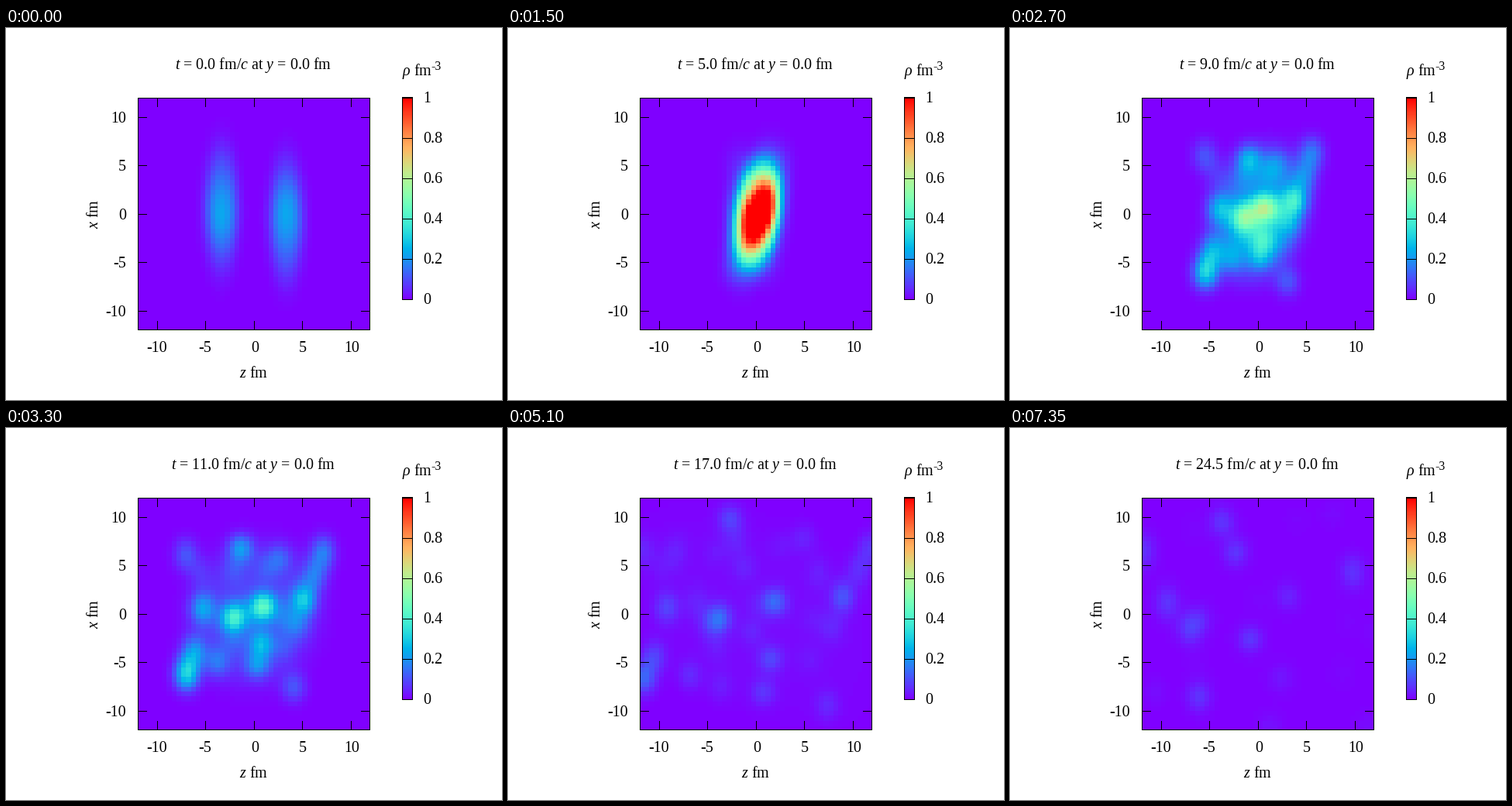
A matplotlib script for the animation above (7500 ms loop, 640 px wide and 480 px high).

```python
import numpy as np
import matplotlib.pyplot as plt
from matplotlib.animation import FuncAnimation
from matplotlib.patches import Rectangle

W, H, DPI = 640, 480, 100
FRAMES, STEP_MS, DT = 50, 150, 0.5
LEFT, TOP, SIZE = 170, 90, 300
BAR_X, BAR_Y, BAR_W, BAR_H = 511, 89, 14, 262

plt.rcParams.update({
    "font.family": "Liberation Serif",
    "mathtext.fontset": "custom",
    "mathtext.rm": "Liberation Serif",
    "mathtext.it": "Liberation Serif:italic",
    "mathtext.cal": "Liberation Serif:italic",
})

# Cell centres of the 48 x 48 density grid, in fm
axis = np.arange(-11.75, 12, 0.5)
Z, X = np.meshgrid(axis, axis)

# Main fragments at t = 13: z, x, density
FRAGMENTS = [
    (8.7, 6.5, 0.12), (7.7, 4.2, 0.10), (6.4, 1.6, 0.18), (5.6, -1.2, 0.07),
    (-8.5, -6.3, 0.23), (-7.6, -4.1, 0.14), (-6.6, 0.6, 0.14), (-8.6, 6.3, 0.08),
    (-1.8, 7.8, 0.14), (3.4, 6.5, 0.07), (1.3, 1.0, 0.22), (-2.6, -0.3, 0.21),
    (1.0, -3.6, 0.14), (0.5, -6.2, 0.11), (-4.8, -5.4, 0.09), (5.2, -8.2, 0.08),
]
# Fragments that drift into the plane late, at t = 24.5: z, x
LATE = [(-3.7, 9.5), (-2.3, 6.4), (9.8, 4.3), (-9.4, 1.2),
        (-7.0, -1.6), (-0.8, -2.6), (-6.1, -8.5), (-11.9, 6.5)]

rng = np.random.default_rng(7)
HAZE = [(z, x, 0.035) for z, x in rng.uniform(-7, 7, (8, 2))]


def smooth(t, a, b):
    u = np.clip((t - a) / (b - a), 0, 1)
    return u * u * (3 - 2 * u)


def blob(z, x, long, short, amp, tilt=90, power=1):
    c, s = np.cos(np.radians(tilt)), np.sin(np.radians(tilt))
    u = ((Z - z) * c + (X - x) * s) / long
    v = ((X - x) * c - (Z - z) * s) / short
    return amp * np.exp(-(u * u + v * v) ** power)


def nuclei(t):
    """Two flattened nuclei passing through each other."""
    fade = 1 - smooth(t, 3, 7.5)
    rho = 0
    for side in (-1, 1):
        z, x = side * (3.35 - 0.94 * t), -0.6 * side
        rho = rho + blob(z, x, 6.2, 1.75, 0.15 * fade, power=1.5)
        rho = rho + blob(z, 0, 3.0, 1.4, 0.08 * fade)
    return rho


def fireball(t):
    """Compressed core that tilts, inside a body that expands."""
    age = max(t - 3, 0)
    tilt = max(90 - 9.5 * age, 25)
    core = blob(0.1 + 0.1 * age, -0.1, max(4.7 - 0.5 * age, 2.7), 1.5,
                1.55 * smooth(t, 0.8, 3) * np.exp(-age / 2.4), tilt)
    long, short = 5 + 0.28 * age, 1.8 + 0.11 * age ** 1.8
    amp = 25 / (long * short ** 2) * smooth(t, 3, 7)
    return core + blob(0.1, 0, long, short, amp, 90 - 2.5 * age, power=2)


def drift(t, t_ref, z, x, amp):
    """Blob flying outwards; its distance grows evenly with time."""
    pace = 13 / t_ref * (t - t_ref)
    rate_z = 0.125 - 0.004 * abs(z)
    rate_x = 0.08 * max(1 - abs(z) / 10, 0)
    return blob(z * (1 + rate_z * pace), x * (1 + rate_x * pace),
                1.35 + 0.04 * abs(z), 1.25, amp)


def density(t):
    rho = nuclei(t) + fireball(t)
    fade = smooth(t, 4, 8) * np.exp((13 - max(t, 11)) / 7)
    for z, x, amp in FRAGMENTS + HAZE:
        rho = rho + drift(t, 13, z, x, amp * fade)
    for z, x in LATE:
        rho = rho + drift(t, 24.5, z, x, 0.065 * smooth(t, 14, 20))
    return rho


fig = plt.figure(figsize=(W / DPI, H / DPI), dpi=DPI, facecolor="white")
ax = fig.add_axes((0, 0, 1, 1))
ax.axis("off")


def rule(x, y, w=1, h=1):
    ax.add_patch(Rectangle((x, y), w, h, fc="black", lw=0, zorder=3))


def frame(x, y, w, h):
    for dy in (0, h - 1):
        rule(x, y + dy, w=w)
    for dx in (0, w - 1):
        rule(x + dx, y, h=h)


def label(x, y, s, ha="center", px=20, **kw):
    return ax.text(x, y, s, ha=ha, va="baseline", fontsize=px * 72 / DPI, **kw)


style = dict(cmap="rainbow", vmin=0, vmax=1, interpolation="nearest", aspect="auto")
heat = ax.imshow(density(0), origin="lower",
                 extent=(LEFT, LEFT + SIZE, TOP + SIZE, TOP), **style)
ax.imshow(np.linspace(1, 0, 128)[:, None],
          extent=(BAR_X, BAR_X + BAR_W, BAR_Y + BAR_H, BAR_Y), **style)
ax.set_xlim(0, W)
ax.set_ylim(H, 0)

frame(LEFT, TOP, SIZE, SIZE)
for v in range(-10, 11, 5):
    px, py = int(320 + 12.5 * v), int(240 - 12.5 * v)
    for far in (0, SIZE - 12):
        rule(px, TOP + far, h=12)
        rule(LEFT + far, py, w=12)
    label(px + (1 if v >= 0 else -0.5), 418, f"{v}")
    label(155, py + 7, f"{v}", ha="right")

frame(BAR_X, BAR_Y, BAR_W, BAR_H)
for i in range(6):
    y = 350 - 52 * i
    rule(BAR_X, y, w=BAR_W)
    label(538.5, y + 6, f"{i / 5:g}", ha="left")

label(319, 451, r"$\mathit{z}$ fm")
label(119, 240, r"$\mathit{x}$ fm", rotation=90, rotation_mode="anchor")
label(511, 61, r"$\mathit{\rho}$ fm", ha="left")
label(548, 54, "-3", ha="left", px=16)
title = label(319, 53, "")


def update(i):
    t = i * DT
    heat.set_data(density(t))
    title.set_text(rf"$\mathit{{t}}$ = {t:.1f} fm/$\mathit{{c}}$ at $\mathit{{y}}$ = 0.0 fm")
    return heat, title


anim = FuncAnimation(fig, update, frames=FRAMES, interval=STEP_MS,
                     repeat=True, repeat_delay=0, blit=False)
plt.show()
```
